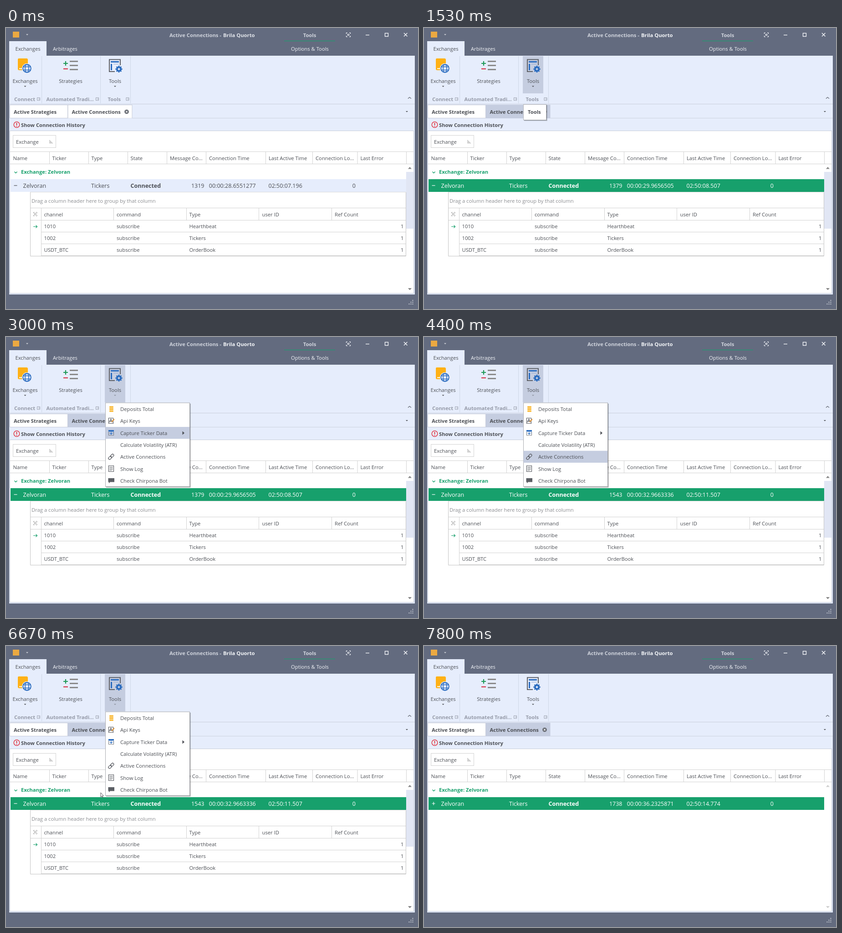
Animation of 905x619 px, one loop 8000 ms. Source, as an HTML page:

```html
<!DOCTYPE html>
<html lang="en">
<head>
<meta charset="utf-8">
<title>Active Connections</title>
<style>
html, body { margin: 0; width: 100%; height: 100%; overflow: hidden; background: #636b7f; }
svg { display: block; width: 905px; height: 619px; }
text { font-family: "Open Sans", "Noto Sans", sans-serif; font-size: 11.25px; fill: #4c4f55; white-space: pre; }
.b { font-weight: 700; }
.row { font-size: 12.5px; }
.end { text-anchor: end; }
.mid { text-anchor: middle; }
</style>
</head>
<body>
<svg id="stage" viewBox="0 0 905 619" xmlns="http://www.w3.org/2000/svg"></svg>
<script>
const PANEL = '#e6edfc', HOVER = '#c5cde0', GREEN = '#17a06c', INK = '#4c4f55',
      GRID = '#d2d2d2', BLUE = '#2b6cbf';

const rect = (x, y, w, h, fill, extra = '') =>
  `<rect x="${x}" y="${y}" width="${w}" height="${h}" fill="${fill}" ${extra}/>`;
const path = (d, stroke, width = 1, extra = '') =>
  `<path d="${d}" fill="none" stroke="${stroke}" stroke-width="${width}" ${extra}/>`;
const shape = (d, fill, extra = '') => `<path d="${d}" fill="${fill}" ${extra}/>`;
const text = (x, y, s, cls = '', fill = '', id = '') =>
  `<text x="${x}" y="${y}" class="${cls}" ${id && `id="${id}"`} ${fill && `style="fill:${fill}"`}>${s}</text>`;
const group = (id, body) => `<g id="${id}">${body}</g>`;
const hline = (x1, x2, y, c = GRID) => path(`M${x1} ${y}H${x2}`, c);
const vline = (x, y1, y2, c = GRID) => path(`M${x} ${y1}V${y2}`, c);
const down = (x, y, c = INK, s = 2.5) => shape(`M${x - s} ${y}h${2 * s}l${-s} ${s}z`, c);

function titleBar() {
  const c = '#f2f4f8';
  return rect(15, 8, 14, 13, '#eba942') + down(46.5, 13.5, '#d5d8df') +
    text(359, 19.5, 'Active Connections -', 'b', '#d0d4dd') +
    text(477, 19.5, 'Brila Quorto', 'b', '#e2e5eb', 'app') +
    text(667, 19.5, 'Tools', 'b mid', '#d0d4dd') + hline(611, 723, 28.5, '#10a56d') +
    path('M747.5 13v-2.500h2.500M754 10.500h2.500v2.500M756.500 17v2.500h-2.500M750 19.500h-2.500v-2.500', c, 1.2) +
    path('M750.500 13.500h3v3h-3z', c, 1.2) +
    path('M790 15.500h8', c, 1.4) + path('M832.500 11.500h7v7h-7z', c, 1.4) +
    path('M874 11l7.500 7.500M881.500 11l-7.500 7.500', c, 1.5) +
    rect(7, 29, 82, 33, PANEL) + text(48, 49.5, 'Exchanges', 'mid') +
    text(103, 49.5, 'Arbitrages', '', c) + text(667.5, 49.5, 'Options &amp; Tools', 'mid', c);
}

function exchangeIcon() {
  return shape('M28 67h17q3 0 3 3v23h-19q-3 0-3-3v-21q0-2 2-2z', '#ffb115') +
    path('M29 89.500h16', '#fff', 2) +
    `<circle cx="46" cy="89" r="11" fill="${PANEL}"/>` +
    `<circle cx="46" cy="89" r="8.800" fill="none" stroke="${BLUE}" stroke-width="1.900"/>` +
    `<ellipse cx="46" cy="89" rx="4" ry="8.800" fill="none" stroke="${BLUE}" stroke-width="1.600"/>` +
    path('M38.500 85.500h15M38.500 92.500h15', BLUE, 1.7);
}

function toolsIcon() {
  let teeth = '';
  for (let a = 0; a < 360; a += 45)
    teeth += rect(246.5, 83, 3, 4, BLUE, `transform="rotate(${a} 248 90.500)"`);
  return path('M239 96H227V69.500H251V82', '#5d6067', 2) +
    path('M230 74.500h18', BLUE, 3) + path('M231.500 79v14', BLUE, 3) +
    path('M236 79.500h12', '#8fa9d6', 1) + teeth +
    `<circle cx="248" cy="90.500" r="4" fill="none" stroke="${BLUE}" stroke-width="3.400"/>`;
}

function ribbon() {
  const gray = '#969ba9', sep = '#ced6e6';
  const launcher = x => path(`M${x} 153.500h6v6h-6zM${x + 2.5} 156.500h3.500`, gray, 0.9);
  return rect(7, 61, 891, 526, PANEL) + rect(217, 62, 45, 82, HOVER, 'id="toolHover"') +
    exchangeIcon() + text(42, 120.5, 'Exchanges', 'mid') + down(42, 127.5) +
    path('M131 73v10M126 78h10', '#1d9855', 2.2) + path('M126 90h10', '#d8344c', 2.2) +
    path('M140 73.500h18M140 82.500h18M140 91.500h18', '#8b8b8b', 3.2) +
    text(142, 120.5, 'Strategies', 'mid') +
    toolsIcon() + text(239.5, 120.5, 'Tools', 'mid') + group('toolArrow', down(239.5, 127.5)) +
    text(18, 160.5, 'Connect', 'b', gray) + launcher(68.5) +
    text(88.5, 160.5, 'Automated Tradi...', 'b', gray) + launcher(197.5) +
    text(223.5, 160.5, 'Tools', 'b', gray) + launcher(264) +
    [78.5, 207.5, 273.5].map(x => vline(x, 62, 166, sep)).join('') +
    path('M883 155.500l3.500-3 3.500 3', '#666b76', 1.3) + hline(7, 898, 167.5, '#c9cfdc');
}

function tabs() {
  const edge = '#c6cbd8';
  return rect(8.5, 169.5, 127, 29, '#fff', `stroke="${edge}"`) +
    text(17, 188.5, 'Active Strategies', 'b') +
    rect(136, 169.5, 141, 29.5, '#fff', `id="tab" stroke="${edge}"`) +
    text(144.5, 188.5, 'Active Connections', 'b') +
    '<circle cx="265" cy="184.500" r="4.800" fill="#666a72"/>' +
    path('M263.200 182.700l3.600 3.600M266.800 182.700l-3.600 3.600', '#fff', 1.2) +
    down(880.5, 183) + hline(277, 898, 198.5, '#cdd3e0') +
    rect(8, 199, 889, 27, PANEL) +
    '<circle cx="23.500" cy="213" r="6.300" fill="none" stroke="#e0222f" stroke-width="1.300"/>' +
    path('M23.500 209v5M23.500 215.500v1.700', '#e0222f', 1.7) +
    text(33, 217.5, 'Show Connection History', 'b');
}

function gridHead() {
  const heads = [['Name', 15.5], ['Ticker', 101.5], ['Type', 187.5], ['State', 273.5],
    ['Message Co...', 360], ['Connection Time', 446], ['Last Active Time', 577],
    ['Connection Lo...', 680], ['Last Error', 778.5]];
  return rect(8.5, 226.5, 887, 358, '#fff', 'stroke="#c8cdd8"') +
    rect(15.5, 236.5, 94, 27, '#fff', `stroke="${GRID}"`) + text(22, 254.5, 'Exchange') +
    path('M95 247.500h2M95 249.500h4M95 251.500h6M95 253.500h8', '#a5a5a5') +
    hline(9, 895, 272.5) + hline(9, 895, 299.5) +
    heads.map(([s, x]) => text(x, 290.5, s)).join('') +
    [95.5, 181.5, 267.5, 353.5, 439.5, 570.5, 673.5, 772, 879.5].map(x => vline(x, 273, 299)).join('') +
    path('M18.500 316.500l3 3 3-3', GREEN, 1.4) + text(33, 321.3, 'Exchange: Zelvoran', 'b', GREEN);
}

function dataRow() {
  return rect(10, 333, 869, 28, PANEL, 'id="rowBack"') +
    group('row', path('', INK, 1.2, 'id="sign"') + text(37.5, 352, 'Zelvoran', 'row') +
      text(187, 352, 'Tickers', 'row') + text(273.5, 352, 'Connected', 'row b') +
      text(435.5, 352, '', 'row end', '', 'count') + text(445.8, 352, '', 'row', '', 'uptime') +
      text(576.5, 352, '', 'row', '', 'last') + text(768, 352, '0', 'row end'));
}

function detail() {
  const cols = [83.5, 243, 402.5, 562.5, 722];
  const rows = [['1010', 'subscribe', 'Hearthbeat'], ['1002', 'subscribe', 'Tickers'],
    ['USDT_BTC', 'subscribe', 'OrderBook']];
  let s = path('M53.500 361V502.500H878.500V361.500', '#c4c4c4') + hline(53, 878, 361.5, '#dcdcdc') +
    text(56, 384.5, 'Drag a column header here to group by that column', '', '#8b8d91') +
    hline(54, 878, 396.5) + hline(54, 878, 423.5) + vline(77.5, 397, 502) +
    [236.5, 396.5, 555.5, 715.5].map(x => vline(x, 397, 423)).join('') +
    path('M60.500 408v-2h2M66 406h2v2M68 412v2h-2M62.500 414h-2v-2M62.500 408.200h3.500v3.500h-3.500z', '#9b9b9b') +
    path('M60 437.500h8.500M65.500 434.500l3 3-3 3', GREEN, 1.2);
  ['channel', 'command', 'Type', 'user ID', 'Ref Count'].forEach((h, i) => s += text(cols[i], 414.5, h));
  rows.forEach((r, j) => {
    const y = 441 + j * 26.2;
    r.forEach((v, i) => s += text(cols[i], y, v));
    s += text(873.5, y, '1', 'end') + hline(78, 878, [449.5, 475.5, 501.5][j]);
  });
  return s + rect(879, 317, 16, 125, '#e1e6f4');
}

function menuIcons() {
  const dark = '#5b5e64', book = 'M225.500 178.500h10v12h-10z';
  const coins = [0, 3.3, 6.6, 9.9].map(d => rect(227, 152.5 + d, 9, 2.5, '#f9b52a', 'rx="1"')).join('');
  const link = x => rect(x, 261.2, 8, 5.2, 'none', `rx="2.600" stroke="${dark}" stroke-width="1.300"`);
  return coins + path(book, dark, 1.2) + path('M227 188l3.500-7.500 3 7.500M228.500 185.500h4', dark, 1.3) +
    path('M232 187l6-6', '#e59535', 2) +
    rect(225, 205, 12, 3.5, BLUE) + path('M225.500 209v7.500h11v-7.500', '#7a7f89', 1.1) +
    path('M231 209v5M228.800 212l2.200 2.400 2.200-2.400M227 211.500h1M234 211.500h1.500', BLUE, 1.2) +
    `<g transform="rotate(-45 231 264)">${link(223.7)}${link(230.3)}</g>` +
    path('M225.500 283.500h11v13h-11z', dark, 1.2) +
    path('M227.500 286.500h7M227.500 289h7M227.500 291.500h7M227.500 294h5', dark, 0.9) +
    shape('M224.500 311h13.500v8.500h-9.500l-2.500 3v-3h-1.500z', dark);
}

function menu() {
  const items = ['Deposits Total', 'Api Keys', 'Capture Ticker Data', 'Calculate Volatility (ATR)',
    'Active Connections', 'Show Log', 'Check Chirpona Bot'];
  return rect(220, 147, 186, 185, '#000', 'opacity=".15"') + rect(219.5, 146.5, 185.5, 184.5, '#000', 'opacity=".25"') +
    rect(218.5, 145, 185, 184.5, '#fff', 'stroke="#a9abb0"') +
    rect(218.5, 0, 184.5, 26.2, HOVER, 'id="itemHover"') + menuIcons() +
    items.map((s, i) => text(251, 163 + i * 26.3, s)).join('') + shape('M387.500 207.500v8l4.500-4z', INK);
}

function tooltip() {
  return rect(220, 170, 51, 35, '#000', 'opacity=".15"') + rect(219.5, 169.5, 50.5, 34.5, '#000', 'opacity=".25"') +
    rect(218.5, 168.5, 50, 34, '#fff', 'stroke="#b4b6bb"') + text(228, 189.3, 'Tools', 'b');
}

function grip() {
  let s = '';
  for (let r = 0; r < 3; r++)
    for (let c = 2 - r; c < 3; c++) s += rect(884.5 + c * 4, 599 + r * 4, 2, 2, '#c5c9d2');
  return s;
}

const stage = document.getElementById('stage');
stage.innerHTML = rect(0, 0, 905, 619, '#636b7f') + titleBar() + ribbon() + tabs() + gridHead() +
  dataRow() + group('detail', detail()) +
  group('arrows', shape('M883 310.500h8l-4-4.500zM883 573h8l-4 4.500z', '#858585')) + grip() +
  group('tip', tooltip()) + group('menu', menu()) +
  group('cursor', shape('M0 0V9.500L2.200 7.500L3.700 10.800L5 10.200L3.600 7H6.300z', '#fff', 'stroke="#44474d" stroke-width=".9"'));

const el = {};
stage.querySelectorAll('[id]').forEach(n => el[n.id] = n);
const set = (id, name, value) => el[id].setAttribute(name, value);
const show = (id, on) => set(id, 'opacity', Number(on));
const clamp = v => Math.max(0, Math.min(1, v));
const latest = (list, k) => list.filter(e => e[0] <= k).pop();

// All times below are in ticks of 1/15 second.
const readings = [
  [0, '1319', '00:00:28.6551277', '02:50:07.196'],
  [21, '1379', '00:00:29.9656505', '02:50:08.507'],
  [66, '1543', '00:00:32.9663336', '02:50:11.507'],
  [101, '1681', '00:00:35.2168442', '02:50:13.758'],
  [111, '1738', '00:00:36.2325871', '02:50:14.774']
];
const hovers = [[0, -1], [40, 0], [42, 1], [45, 2], [47, 3], [50, 4], [90, -1]];
const route = [[89, 262, 256], [95, 17, 26], [100, 208, 323], [101, 208, 323], [102, 116, 302], [103, 24, 279]];

function cursorAt(k) {
  const i = Math.max(1, route.findIndex(p => p[0] >= k));
  const [a, x1, y1] = route[i - 1], [b, x2, y2] = route[i];
  const f = clamp((k - a) / (b - a));
  return [x1 + (x2 - x1) * f, y1 + (y2 - y1) * f];
}

function draw(ms) {
  const k = Math.floor((ms + 4) * 0.015);
  const focused = k >= 10, open = k >= 30 && k < 101, folded = k >= 117;

  el.app.style.fill = focused ? '#f4f6f9' : '#e2e5eb';
  set('tab', 'fill', focused ? HOVER : '#fff');
  set('tab', 'stroke', focused ? HOVER : '#c6cbd8');
  set('rowBack', 'fill', focused ? GREEN : PANEL);
  el.row.querySelectorAll('text').forEach(n => n.style.fill = focused ? '#fff' : INK);
  set('sign', 'stroke', focused ? '#fff' : INK);
  set('sign', 'd', folded ? 'M17.500 347h7M21 343.500v7' : 'M17.500 347h7');

  const [, count, uptime, last] = latest(readings, k);
  el.count.textContent = count;
  el.uptime.textContent = uptime;
  el.last.textContent = last;

  show('toolHover', k >= 14 && k < 101);
  set('toolArrow', 'opacity', open ? 0.45 : 1);
  set('tip', 'opacity', k < 30 ? clamp((k - 20) / 3) : 0);
  set('menu', 'opacity', open ? clamp((k - 29) / 3) : 0);
  const item = latest(hovers, k)[1];
  show('itemHover', item >= 0);
  set('itemHover', 'y', 145.5 + item * 26.3);

  show('cursor', k >= 89 && k < 104);
  set('cursor', 'transform', `translate(${cursorAt(k)})`);
  show('detail', !folded);
  set('arrows', 'opacity', folded ? 0.4 : 1);
}

function loop() {
  draw(performance.now() % 8000);
  requestAnimationFrame(loop);
}
loop();
</script>
</body>
</html>
```
